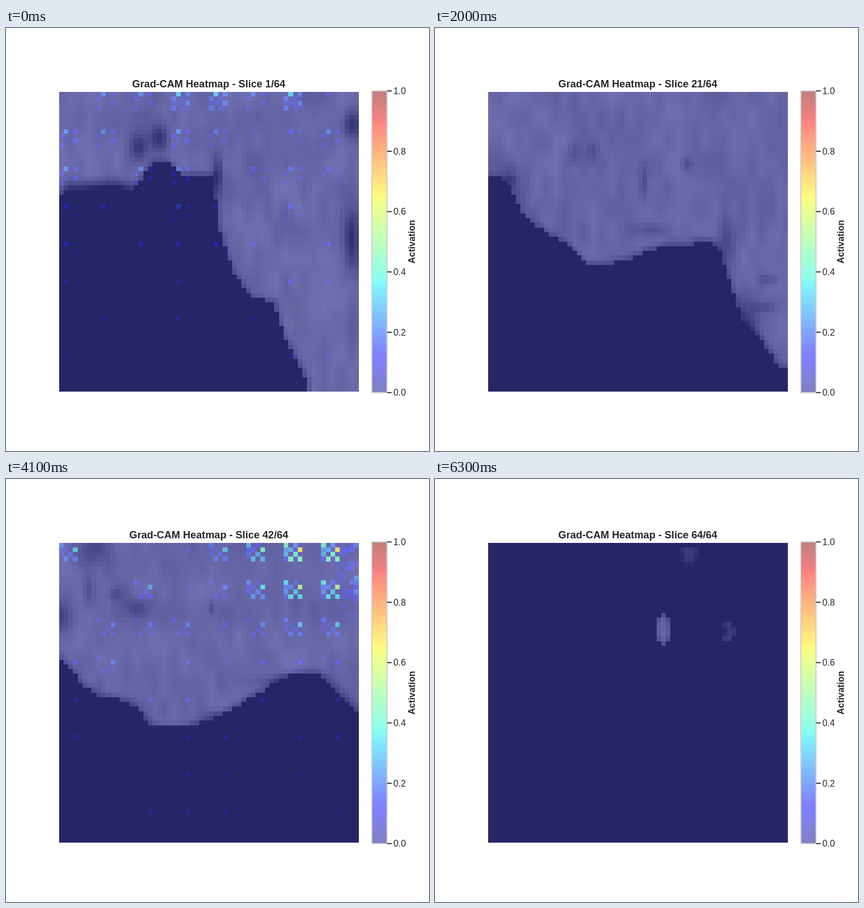
An HTML page with a canvas that plays this animation: 748 by 748 pixels, repeating every 6400 ms.

```html
<!DOCTYPE html>
<html lang="en">
<head>
<meta charset="utf-8">
<title>Grad-CAM Heatmap</title>
<style>
  html, body { margin: 0; width: 100%; height: 100%; overflow: hidden; background: #fff; }
  canvas, svg { position: absolute; left: 0; top: 0; }
  text { font-family: "Liberation Sans", Arial, sans-serif; font-size: 15.9px; fill: #262626; }
  .bold { font-weight: bold; text-anchor: middle; }
  #title { font-size: 18.2px; }
</style>
</head>
<body>
<canvas id="view" width="748" height="748"></canvas>
<svg id="axes" width="748" height="748" viewBox="0 0 748 748">
  <rect x="647" y="111.3" width="26.7" height="533.4" fill="none" stroke="#ccc" stroke-width="1.8"/>
  <text id="title" class="bold" x="358.5" y="104.5"></text>
  <text class="bold" transform="translate(723 378) rotate(-90)">Activation</text>
</svg>
<script>
const N = 64, SLICE_MS = 100, DARK = 76, TISSUE = 206, FAR = 20;
const ctx = document.getElementById('view').getContext('2d');
const axes = document.getElementById('axes');
const title = document.getElementById('title');

const clamp = (v, lo, hi) => Math.min(hi, Math.max(lo, v));
const ramp = (v, a, b) => clamp((v - a) / (b - a), 0, 1);
const lerp = (a, b, u) => a + (b - a) * u;
const bell = (v, mid, width) => Math.exp(-(((v - mid) / width) ** 2));

// Jet colormap, channels 0..1
const jet = v => [
  ramp(v, .35, .66) - .5 * ramp(v, .89, 1),
  ramp(v, .125, .375) - ramp(v, .64, .91),
  .5 + .5 * ramp(v, 0, .11) - ramp(v, .34, .65)
];
const overlay = (gray, v) => jet(v).map(c => gray / 2 + c * 127.5);

function hash(x, y, z) {
  let h = Math.imul(x + 101, 374761393) ^ Math.imul(y + 57, 668265263) ^ Math.imul(z + 31, 1274126177);
  h = Math.imul(h ^ (h >>> 13), 1103515245);
  return ((h ^ (h >>> 16)) >>> 0) / 4294967296;
}

function noise(x, y, z) {
  const i = Math.floor(x), j = Math.floor(y), k = Math.floor(z);
  const s = t => t * t * (3 - 2 * t);
  const u = s(x - i), v = s(y - j), w = s(z - k);
  const row = (b, c) => lerp(hash(i, b, c), hash(i + 1, b, c), u);
  const plane = c => lerp(row(j, c), row(j + 1, c), v);
  return lerp(plane(k), plane(k + 1), w) * 2 - 1;
}

// Signed distance to closed outlines, positive inside
function distance(outlines, x, y) {
  let best = Infinity, inside = false;
  for (const points of outlines) {
    points.forEach(([bx, by], i) => {
      const [ax, ay] = points.at(i - 1), dx = bx - ax, dy = by - ay;
      const t = clamp(((x - ax) * dx + (y - ay) * dy) / (dx * dx + dy * dy || 1), 0, 1);
      best = Math.min(best, Math.hypot(x - ax - t * dx, y - ay - t * dy));
      if ((ay > y) !== (by > y) && x < ax + dx * (y - ay) / dy) inside = !inside;
    });
  }
  return inside ? best : -best;
}

// Everything above a lower edge that runs from left to right
const above = edge => [
  [-FAR, edge[0][1]], ...edge, [N + FAR, edge.at(-1)[1]], [N + FAR, -FAR], [-FAR, -FAR]
];
const ellipse = (cx, cy, rx, ry) => Array.from({ length: 12 }, (_, i) => {
  const a = i * Math.PI / 6;
  return [cx + rx * Math.cos(a), cy + ry * Math.sin(a)];
});

const cells = fn => Float32Array.from({ length: N * N }, (_, n) => fn(n % N + .5, Math.floor(n / N) + .5));

const keys = [];
// Outlines and dark hollows (x, y, rx, ry) of the volume at one slice
function section(at, outlines, hollows) {
  keys.push({
    at,
    depth: cells((x, y) => distance(outlines, x, y)),
    shade: cells((x, y) => hollows.reduce(
      (sum, [cx, cy, rx, ry]) => sum + 100 * bell(x, cx, rx) * bell(y, cy, ry), 0))
  });
}

section(0,
  [above([[0, 22], [2, 21], [16, 21], [20, 15], [23, 15], [26, 17.5], [33, 18], [34, 29], [37, 38],
    [41, 44], [46, 45], [48, 52], [53, 62], [54, 80]])],
  [[17, 12, 2, 3], [21.5, 10, 2, 3], [34, 17, 1, 4], [62.5, 7, 2, 3], [62.5, 31, 1.8, 7], [9, 20.5, 8, 1.7]]);
section(15,
  [above([[0, 20], [12, 20], [17, 24], [24, 28.5], [24.3, 32], [29, 32], [31, 30], [39, 32], [43, 35],
    [45, 33], [48, 35], [51, 43], [58, 53], [61, 60]])],
  [[22.3, 13, 1.3, 2.5], [42.5, 15.5, 1.2, 1.8], [59, 46, 2, 1], [35, 29.5, 4, 1.5]]);
section(25,
  [above([[0, 16], [6, 18], [1, 25], [3, 33], [12, 38.5], [20, 42], [26, 42], [35, 38], [40, 32.5],
    [46, 30], [50, 30], [54, 44], [54, 49], [60, 54], [64, 58]])],
  [[18.4, 13.5, 1.3, 2.6], [33.4, 19, .9, 3.5], [60, 40, 2.3, 1.2], [51, 32, 2, 5], [56, 48, 2, 5], [5, 18, 2.5, 3]]);
section(34,
  [above([[0, 31], [3, 35], [8, 38], [15, 37], [20, 41], [28, 41], [38, 35], [44, 31], [51, 27],
    [56, 27], [57, 28], [57, 48], [60, 53], [64, 55]])],
  [[16.5, 14, 3, 2.2], [12, 11, 1.5, 1.5], [.5, 16, 2.5, 3.5], [59.5, 40, 4, 8], [33, 37, 2, 1.3]]);
section(48,
  [above([[0, 4], [6, 4], [8, 7], [5, 17], [7, 26], [16, 31], [21, 38], [33, 37.5], [43, 32], [48, 29], [64, 29.5]])],
  [[7, 2, 3.5, 4], [6.5, 10, 1.3, 4], [32.5, 14, .7, 1.5], [47, 29.5, 6, 1.2]]);
section(56,
  [above([[20, -FAR], [19, 6], [20, 16], [22, 26], [27, 30], [35, 29], [38, 32], [43, 32], [46, 29], [50, 29], [54, 26]])],
  [[20.5, 14, 2.5, 4], [30.5, 13, 1, 3], [43.4, 19, .8, 2.5], [58, 25.3, 7, 1.5]]);
section(63,
  [ellipse(43, 3, 2.1, 2.4), ellipse(37.5, 18.5, 2, 3.2), ellipse(51.4, 19, 1.5, 2.2)],
  [[43, 4, 4, 4], [51, 19, 2, 2]]);

function between(k) {
  const i = Math.max(1, keys.findIndex(key => key.at >= k));
  const a = keys[i - 1], b = keys[i], u = ramp(k, a.at, b.at);
  return name => n => lerp(a[name][n], b[name][n], u);
}

// Peak of one 8 x 8 block: a swelling hot corner plus scattered weak hits
function peak(i, j, k) {
  const corner = .72 * bell(k, 36, 24) * bell(i, 6.5, 2.2) * bell(j, 0, 2.2);
  const r = hash(i, j, k >> 3);
  return Math.max(corner, r > .45 ? .36 * r * Math.exp(-j / 4) : 0);
}

// Upsampling checkerboard: hits fill 4 of every 8 cells along x, y and slices
const crest = [[1, 0], [3, 1], [3, 0], [0, 1]];
function activation(x, y, k) {
  const phase = k % 8, cx = x % 8, cy = y % 8;
  if (phase > 3) return 0;
  const r = hash(x, y, k);
  let v = 0;
  if (cx < 4 && cy < 4) {
    const [px, py] = crest[phase], h = hash(cx, cy, phase);
    const odd = (cx + cy + phase) % 2;
    const p = cx === px && cy === py ? 1 : odd ? .5 + .3 * h : .2 + .35 * h;
    v = peak(x >> 3, y >> 3, k) * p - .25 * (1 - p);
  }
  const fringe = bell(k, 38, 9) * ramp(x, 58, 63) * ramp(y, 18, 8);
  return Math.max(0, v, fringe * .45 * (r - .35));
}

const grid = document.createElement('canvas');
grid.width = grid.height = N;
const gridCtx = grid.getContext('2d');
const pixels = gridCtx.createImageData(N, N);

function drawSlice(k) {
  const mix = between(k), depth = mix('depth'), shade = mix('shade');
  for (let n = 0; n < N * N; n++) {
    const x = n % N, y = Math.floor(n / N), d = depth(n);
    let gray = DARK;
    if (d > 0) {
      const grain = 14 * noise(x / 2, y / 5, k / 5) + 12 * noise(x / 6 + 40, y / 7, k / 6);
      gray = clamp(TISSUE + grain - shade(n) - 50 * bell(d, 0, .9), DARK, 252);
    }
    pixels.data.set([...overlay(gray, activation(x, y, k)), 255], n * 4);
  }
  gridCtx.putImageData(pixels, 0, 0);
  ctx.fillStyle = '#fff';
  ctx.fillRect(92, 111, 534, 534);
  ctx.imageSmoothingEnabled = false;
  ctx.drawImage(grid, 93.5, 112.6, 530, 530);
  title.textContent = `Grad-CAM Heatmap - Slice ${k + 1}/${N}`;
}

function drawScale() {
  for (let y = 0; y < 534; y++) {
    ctx.fillStyle = `rgb(${overlay(255, 1 - y / 533).map(Math.round)})`;
    ctx.fillRect(647, 111 + y, 27, 1);
  }
  const add = (name, attrs) => {
    const el = document.createElementNS(axes.namespaceURI, name);
    for (const key in attrs) el.setAttribute(key, attrs[key]);
    return axes.appendChild(el);
  };
  for (let i = 0; i <= 5; i++) {
    const y = 644.7 - i * 106.68;
    add('path', { d: `M674 ${y}h8`, stroke: '#262626', 'stroke-width': 1.8 });
    add('text', { x: 685, y: y + 5.6 }).textContent = (i / 5).toFixed(1);
  }
}

let shown = -1;
function tick() {
  const k = Math.floor(performance.now() / SLICE_MS) % N;
  if (k !== shown) drawSlice(shown = k);
  requestAnimationFrame(tick);
}

drawScale();
tick();
</script>
</body>
</html>
```
